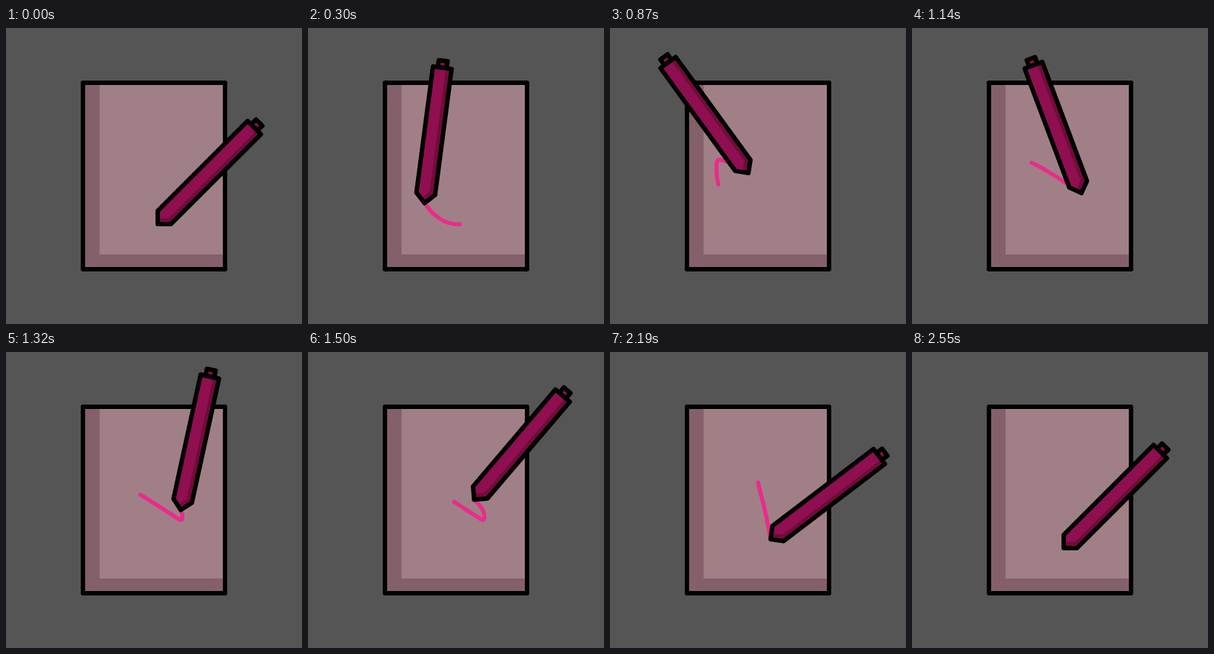
An HTML page for the animation above (4610 ms loop, 400 by 400 pixels).

```html
<!DOCTYPE html>
<html lang="en">
<head>
<meta charset="utf-8">
<title>Notebook and pen</title>
<style>
  html, body { margin: 0; width: 100%; height: 100%; overflow: hidden; background: #555; }
  svg { display: block; width: 100%; height: 100%; }
  .line { fill: none; stroke: #000; stroke-width: 6; stroke-linejoin: round; stroke-linecap: round; }
</style>
</head>
<body>
<svg viewBox="0 0 400 400">
  <rect x="104" y="74" width="192" height="252" fill="#a08086"/>
  <path d="M104 74H126.500V306H296V326H104Z" fill="#83606a"/>
  <rect class="line" x="104" y="74" width="192" height="252"/>
  <path id="trail" fill="none" stroke="#e92c8b" stroke-width="5.500" stroke-linecap="round" stroke-linejoin="round"/>
  <!-- pen: tip at the origin, axis along +x -->
  <g id="pen">
    <path d="M184.500 -6H194V6H184.500Z" fill="#8f0f50"/>
    <path d="M184.500 1H194V6H184.500Z" fill="#6f0d38"/>
    <path class="line" d="M184.500 -6H194V6H184.500Z"/>
    <path d="M0 0L12.700 -12.700H184.500V12.700H12.700Z" fill="#8f0f50"/>
    <path d="M0 0L5.700 -5.700L16.300 5H184.500V12.700H12.700Z" fill="#6f0d38"/>
    <path class="line" d="M0 0L12.700 -12.700H184.500V12.700H12.700Z"/>
  </g>
</svg>
<script>
  const LOOP = 4610, END = 2550, STEP = 30, TAIL = 79, DRAIN = 2190;

  // time, turn from rest in degrees, stroke drawn up to that time
  const keys = [
    [0, 0, 'M205 265'],
    [540, -67.8, 'C175 268 145 232 144 194'],
    [650, -82, 'C144 185 143 177 149 178'],
    [1140, -65.6, 'C168 181 205 208 229 223'],
    [1240, -47, 'C234 226 238 230 238.5 222'],
    [1500, -4.6, 'C238 214 232 206 224.500 199.500'],
    [1650, 5, 'C221 195 218 190 215 185'],
    [1790, 20, 'C211 179 207 173 203 171'],
    [1890, 16.2, 'C198 169 200 177 203 189'],
    [2190, 7.700, 'C208 206 213 230 217 253'],
    [END, 0, 'C218 264 212 266 205 265']
  ];

  const trail = document.getElementById('trail');
  const pen = document.getElementById('pen');

  let d = '';
  const lengths = keys.map(k => {
    d += k[2];
    trail.setAttribute('d', d);
    return trail.getTotalLength();
  });
  const total = lengths[lengths.length - 1];
  const times = keys.map(k => k[0]);

  // smooth curve through the keys, flat at turning points
  function curve(vals) {
    const slopes = vals.slice(1).map((v, i) => (v - vals[i]) / (times[i + 1] - times[i]));
    const tangents = vals.map((_, i) => {
      const a = slopes[Math.max(i - 1, 0)];
      const b = slopes[Math.min(i, slopes.length - 1)];
      return a * b < 0 ? 0 : (a + b) / 2;
    });
    return t => {
      let i = 0;
      while (i < times.length - 2 && t >= times[i + 1]) i++;
      const h = times[i + 1] - times[i];
      const u = (t - times[i]) / h, w = 1 - u;
      return w * w * (1 + 2 * u) * vals[i] + u * u * (3 - 2 * u) * vals[i + 1]
        + h * u * w * (w * tangents[i] - u * tangents[i + 1]);
    };
  }

  const headAt = curve(lengths);
  const turnAt = curve(keys.map(k => k[1]));

  function draw(t) {
    const head = Math.min(Math.max(headAt(t), 0), total);
    const p = trail.getPointAtLength(head);
    pen.setAttribute('transform', `translate(${p.x} ${p.y}) rotate(${turnAt(t) - 45})`);

    const reach = t > DRAIN ? TAIL * (END - t) / (END - DRAIN) : TAIL;
    const len = Math.min(head, reach);
    trail.style.visibility = len > 0.5 ? 'visible' : 'hidden';
    trail.style.strokeDasharray = `${len} ${total + 100}`;
    trail.style.strokeDashoffset = len - head;
  }

  const start = performance.now();
  function tick() {
    const t = (performance.now() - start) % LOOP;
    draw(Math.min(Math.floor(t / STEP) * STEP, END));
    requestAnimationFrame(tick);
  }
  tick();
</script>
</body>
</html>
```
